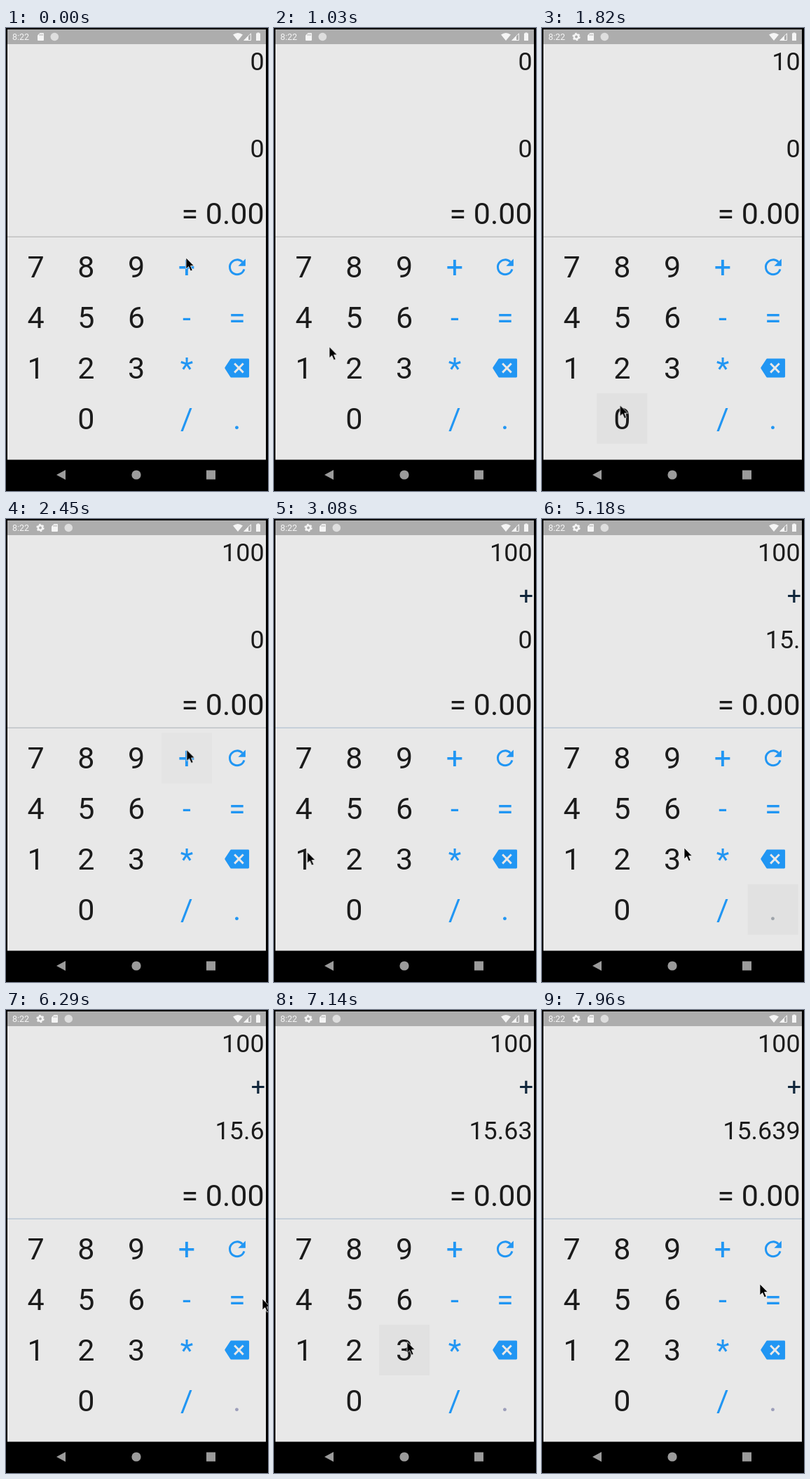
These frames come from a looping animation (374 by 659 pixels, 8 s). An HTML page:

```html
<!DOCTYPE html>
<html lang="en">
<head>
<meta charset="utf-8">
<title>Calculator</title>
<style>
html, body { margin: 0; width: 100%; height: 100%; overflow: hidden; background: #000; }
svg { display: block; }
text { font-family: Roboto, Arial, sans-serif; fill: #1b1b1b; }
.key { font-size: 43px; text-anchor: middle; }
.num { font-size: 35.9px; text-anchor: end; }
.result { font-size: 43px; text-anchor: end; }
.blue { fill: #2196f3; }
.clock { font-size: 12.5px; }
.light { fill: #f5f5f5; }
.nav { fill: #9b9b9b; }
.press { fill: #e1e1e1; opacity: 0; }
.op { fill: #10263b; }
#icons { animation: slide 8s infinite; }
#gear { transform-origin: 49px 12.5px; animation: pop 8s infinite; }
#dot { animation: dim 8s infinite; }
#divider { animation: tint 8s infinite; }
@keyframes slide { 0%, 13.8% { transform: translateX(0); } 17.3%, 100% { transform: translateX(20px); } }
@keyframes pop { 0%, 14.5% { transform: scale(0); } 17.3%, 100% { transform: scale(1); } }
@keyframes dim {
  0%, 60.7% { fill: #2196f3; }
  61.5%, 66% { fill: #9ea4aa; }
  70%, 100% { fill: #9c9eba; }
}
@keyframes tint { 0%, 30% { fill: #b6b6b6; } 33%, 100% { fill: #b0c0d0; } }
</style>
</head>
<body>
<svg width="374" height="659" viewBox="0 0 374 659">
  <rect width="374" height="659"/>
  <rect x="2" y="2" width="369" height="612.5" fill="#e8e8e8"/>
  <rect x="2" y="2" width="369" height="21" fill="#adadad"/>
  <rect id="divider" x="2" y="296.6" width="369" height="1.2"/>

  <text class="clock light" x="9" y="17">8:22</text>
  <g id="gear" fill="none" stroke="#f5f5f5">
    <circle cx="49" cy="12.5" r="3.2" stroke-width="2.6"/>
    <circle cx="49" cy="12.5" r="4.9" stroke-width="1.6" stroke-dasharray="2.6 2.53"/>
  </g>
  <g id="icons" class="light">
    <path d="M48.5 7H53q1 0 1 1v9q0 1-1 1H46q-1 0-1-1V10.5Z"/>
    <path d="M48.2 8.5v2.5m2-2.5v2.5m2-2.5v2.5" stroke="#adadad" stroke-width=".9"/>
    <circle cx="69.3" cy="12.5" r="5.8" fill="#dedede"/>
  </g>
  <g class="light">
    <path d="M331 18L324 9.5Q331 4.5 338 9.5Z"/>
    <path d="M349.500 7.800V17.500H339.800Z" fill="none" stroke="#f5f5f5"/>
    <path d="M346 11.3V18H339.3Z"/>
    <path d="M358.5 7.5v-1h3v1H363V18h-6V7.5Z"/>
  </g>

  <g id="display">
    <text class="result" x="368.6" y="279">= 0.00</text>
  </g>
  <g id="pad"></g>

  <g stroke="#2196f3" stroke-width="2">
    <g transform="translate(312 322.4) scale(1.495)">
      <path d="M18.7 14A7 7 0 1 1 17 7.1" fill="none"/>
      <path class="blue" stroke="none" d="M20 4V11H13Z"/>
    </g>
    <g transform="translate(312 466) scale(1.46 1.495)">
      <path class="blue" stroke-linejoin="round" d="M1.200 12L6.500 4H23V20H6.500Z"/>
      <path stroke="#e8e8e8" d="M9.700 7.700l8.600 8.600m0-8.600l-8.600 8.600"/>
    </g>
  </g>

  <g class="nav">
    <path d="M72 636L85 629V643Z"/>
    <circle cx="186" cy="636" r="6.6"/>
    <rect x="286" y="629.5" width="13" height="13"/>
  </g>

  <path id="cursor" d="M0 0V16L3.7 12.6L6.5 19L9.2 17.8L6.5 11.6H11.3Z" stroke="#f4f4f4" stroke-width=".8"/>
</svg>
<script>
const LOOP = 8000;
const pad = document.getElementById('pad');
const display = document.getElementById('display');
const rows = ['789+ ', '456-=', '123* ', ' 0 /.'];

function add(parent, tag, attrs, text = '') {
  const el = document.createElementNS('http://www.w3.org/2000/svg', tag);
  for (const k in attrs) el.setAttribute(k, attrs[k]);
  el.textContent = text;
  parent.append(el);
  return el;
}

// points: [ms, properties]
function play(el, points, easing) {
  el.animate(points.map(([ms, props]) => ({ offset: ms / LOOP, easing, ...props })),
    { duration: LOOP, iterations: Infinity });
}

function keyPos(ch) {
  const r = rows.findIndex(row => row.includes(ch));
  return [42.5 + 71.8 * rows[r].indexOf(ch), 340.5 + 71.75 * r];
}

// Key, time of the press, pointer tip relative to the key's centre
const presses = [
  ['1', 1370, 5, -8], ['0', 1750, -3, -19], ['0', 2010, -3, -19], ['+', 2480, 0, -12],
  ['1', 3220, 5, -10], ['5', 3640, -2, -9], ['.', 4860, -10, 16], ['6', 5540, 1, -10],
  ['3', 7000, 4, -6], ['9', 7460, 0, 4]
];

// Pointer stops away from the presses: ms, x, y
const stops = [
  [0, 257, 327], [490, 257, 327], [3780, 254, 443], [4030, 254, 443], [4040, 320, 470],
  [5180, 203, 468], [6290, 366, 411], [6460, 356, 453], [7950, 311, 390], [LOOP, 311, 390]
];

const first = [[0, '0']], op = [], second = [[0, '0']];
for (const [ch, at, dx, dy] of presses) {
  const [x, y] = keyPos(ch);
  stops.push([at - 140, x + dx, y + dy], [at + 110, x + dx, y + dy]);

  const tile = add(pad, 'rect', { class: 'press', x: x - 36, y: y - 36, width: 72, height: 72 });
  play(tile, [[0, { opacity: 0 }], [at - 60, { opacity: 0 }], [at, { opacity: 1 }],
    [at + 330, { opacity: 1 }], [at + 400, { opacity: 0 }], [LOOP, { opacity: 0 }]]);

  if (ch === '+') { op.push([at, ch]); continue; }
  const states = op.length ? second : first;
  const typed = states.length > 1 ? states.at(-1)[1] : '';
  states.push([at, typed + ch]);
}

for (const ch of rows.join('').replaceAll(' ', '')) {
  const [x, y] = keyPos(ch);
  const el = add(pad, 'text', { class: /\d/.test(ch) ? 'key' : 'key blue', x, y: y + 14.9 }, ch);
  if (ch === '.') el.id = 'dot';
}

// Each state shows from its time until the next one
function line(x, y, states, cls = '') {
  states.forEach(([from, value], i) => {
    const to = states[i + 1]?.[0] ?? LOOP;
    const el = add(display, 'text', { class: 'num ' + cls, x, y }, value);
    play(el, [[0, { opacity: from ? 0 : 1 }], [from, { opacity: 1 }], [to, { opacity: 0 }],
      [LOOP, { opacity: 0 }]], 'step-end');
  });
}
line(368.6, 60, first);
line(370, 122, op, 'op');
line(368.6, 184, second);

stops.sort((a, b) => a[0] - b[0]);
play(document.getElementById('cursor'),
  stops.map(([ms, x, y]) => [ms, { transform: `translate(${x}px, ${y}px)` }]), 'ease-in-out');
</script>
</body>
</html>
```
